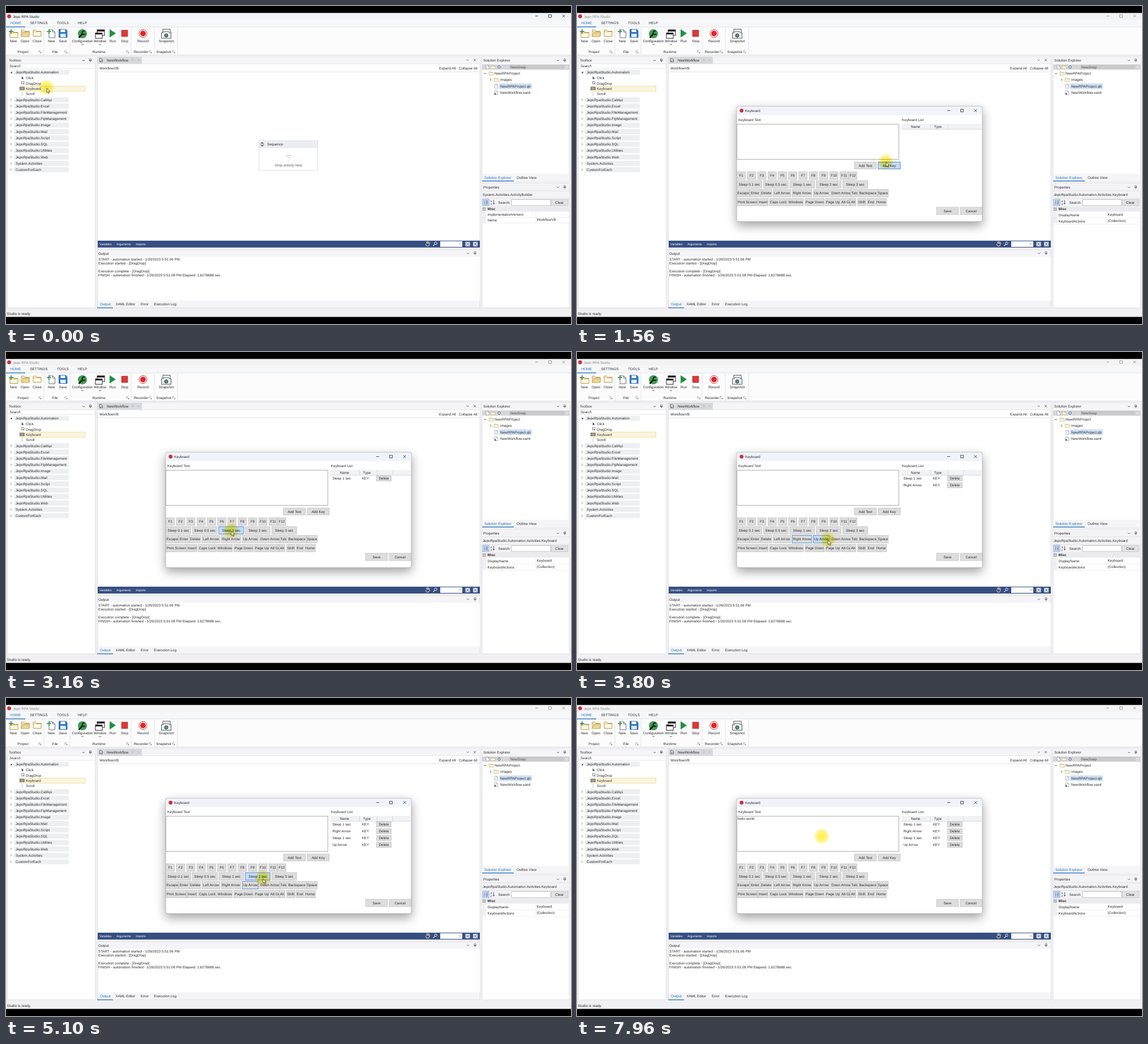
These frames come from a looping animation (998x561 px, 8000 ms). An HTML page:

```html
<!DOCTYPE html>
<html lang="en">
<head>
<meta charset="utf-8">
<title>Jepo RPA Studio</title>
<style>
html, body { margin: 0; width: 100%; height: 100%; overflow: hidden; background: #000; }
svg { display: block; width: 998px; height: 561px; }
text { font: 6.24px "Liberation Sans", Arial, sans-serif; fill: #2b2b2b; text-rendering: geometricPrecision; white-space: pre; }
.mid { text-anchor: middle; }
.it { font-style: italic; }
.bold { font-weight: bold; }
.blue { fill: #1f6fbf; }
.tree { font-size: 6.35px; }
.bar { font-size: 5.3px; fill: #fff; }
.glow { mix-blend-mode: multiply; }
.btn rect { fill: #dddddd; stroke: #b4b4b4; stroke-width: .6; }
.btn.focus rect { stroke: #4a7fc0; stroke-width: .9; }
.btn.hover rect { fill: #c3dbf8; stroke: #4a7fc0; stroke-width: .9; }
</style>
</head>
<body>
<svg id="stage" viewBox="0 0 998 561"></svg>
<script>
const LOOP = 8000;
const APP = 'Jepo RPA Studio', NS = 'JepoRpaStudio.';

// Markup helpers; text y is the vertical middle of the line.
const text = (x, y, s, cls = '', extra = '') =>
  `<text x="${x}" y="${y + 2.2}" class="${cls}" ${extra}>${s}</text>`;
const rect = (x, y, w, h, fill = 'none', stroke = 'none', sw = .6, extra = '') =>
  `<rect x="${x}" y="${y}" width="${w}" height="${h}" fill="${fill}" stroke="${stroke}" stroke-width="${sw}" ${extra}/>`;
const path = (d, stroke = '#444', fill = 'none', sw = .8) =>
  `<path d="${d}" stroke="${stroke}" fill="${fill}" stroke-width="${sw}"/>`;
const circle = (x, y, r, fill, stroke = 'none', sw = 1) =>
  `<circle cx="${x}" cy="${y}" r="${r}" fill="${fill}" stroke="${stroke}" stroke-width="${sw}"/>`;
const at = (x, y, s, k = 1) => `<g transform="translate(${x} ${y}) scale(${k})">${s}</g>`;
const group = (id, s) => `<g id="${id}">${s}</g>`;
const each = (list, fn) => list.map(fn).join('');

const chevron = (x, y, c) => path(`M${x - 2} ${y - 1}l2 2 2-2`, c);
const cross = (x, y, r = 2, c) => path(`M${x - r} ${y - r}l${2 * r} ${2 * r}m0 ${-2 * r}l${-2 * r} ${2 * r}`, c);
const pin = (x, y, c) => path(`M${x - 1.4} ${y - 2.6}h2.8v3h-2.8zM${x - 2.3} ${y + .4}h4.6M${x} ${y + .4}v2.5`, c, 'none', .7);
const drop = (x, y) => path(`M${x - 4.3} ${y - 2.4}h8.6l-4.3 5z`, '#b2b2b2', '#fff', .7);
const folder = (x, y, k = 1) => at(x, y, path('M-7 5.5v-11h5l1.5 2h7.5v9z', '#b89b4c', '#fff8e2', 1) + path('M-7-2.5h14', '#b89b4c'), k);
const page = (x, y, k = 1) => at(x, y, path('M-5-7h6.5l4 4v10H-5zM1.5-7v4h4', '#6a6f78', '#fff', 1), k);
const plus = (x, y) => path(`M${x - 4} ${y}h8m-4-4v8`, '#2f8a3c', 'none', 1.5);
const keys = (x, y) => rect(x, y, 8, 5, '#777', '#555', .5) +
  path(`M${x + 1} ${y + 1.5}h6m-6 1.2h6m-5 1.2h4`, '#ddd', 'none', .5);
const flow = (x, y) => path(`M${x} ${y - 3.8}l1.8 2h-3.6zM${x} ${y + 3.8}l1.8-2h-3.6zM${x - 2.5} ${y - 1.6}v3.2m5-3.2v3.2`, '#444', '#555', .7);
const winKeys = (x1, x2, x3, y, c) => path(`M${x1 - 2.5} ${y}h5`, c) + rect(x2 - 2.3, y - 2.3, 4.6, 4.6, 'none', c, .8) + cross(x3, y, 2.4, c);

function ribbon() {
  const labels = [['New', 13], ['Open', 33.5], ['Close', 55], ['New', 80], ['Save', 100.5], ['Configuration', 135],
    ['Window', 166], ['Run', 188.5], ['Stop', 209.5], ['Record', 242], ['Snapshot', 283]];
  const groups = [['Project', 30, 60, 67], ['File', 86.5, 106, 113], ['Runtime', 164, 215, 221],
    ['Recorder', 238.5, 255, 262], ['Snapshot', 278.5, 296, 303]];
  return rect(0, 24, 998, 13, '#f6f7f9') + rect(0, 37, 998, 49.5, '#fcfcfd') +
    path('M0 37h998M0 86.5h998', '#d9dade', 'none', .7) + rect(0, 36.2, 34, 1.3, '#1f6fbf') +
    text(17, 29.5, 'HOME', 'mid blue') + text(58, 29.5, 'SETTINGS', 'mid') + text(100.5, 29.5, 'TOOLS', 'mid') + text(135, 29.5, 'HELP', 'mid') +
    each(labels, ([s, x]) => text(x, 62, s, 'mid')) +
    each(groups, ([s, x, lx, line]) => text(x, 80.5, s, 'mid') + path(`M${line} 38v48`, '#dcdde1') +
      path(`M${lx - 2} 82.5v-3.5h3.5m-1.5 2l2 2m0-2v2h-2`, '#666', 'none', .6)) +
    folder(14, 50) + plus(9, 45) +
    folder(34, 48) + path('M26.5 54l3-7h12.5l-2 7z', '#b89b4c', '#efd78e') + folder(55, 48) +
    page(81, 49) + plus(76, 45) +
    path('M93.5 41h12l2.5 2.5V55.5H93.5z', '#1d5fae', '#2f77c8') + rect(96.5, 41.5, 8, 4.5, '#fff') + rect(96, 49, 9.5, 6, '#e8f0fa') +
    circle(135, 49, 8, '#3f9f50') + path('M128.5 56l6.5-7', '#1d1d1d', 'none', 2.6) + path('M139 44.5a3 3 0 1 0 1 4.5', '#1d1d1d', 'none', 2) +
    chevron(135, 68) + chevron(166, 68) +
    rect(161, 42, 13, 10, '#fff', '#222', 1) + rect(161, 42, 13, 3, '#222') + rect(158, 47.5, 12, 9.5, '#fff', '#222', 1) + rect(158, 47.5, 12, 2.6, '#222') +
    path('M183 41l11 7.2-11 7.2z', 'none', '#1f9140') + rect(204, 42.5, 11, 11.5, '#d9393a', '#b92c2e') +
    circle(242, 48.5, 7, '#fff', '#c9393b') + circle(242, 48.5, 5, '#e0262b') +
    rect(277, 41, 13, 9, '#fff', '#444', 1) + path('M274.5 47h3l1.5-2h8l1.5 2h3v10h-17z', '#333', '#e9edf0') + circle(283, 52, 3, '#4b9a8e', '#333');
}

function toolbox() {
  const cats = ['CallApi', 'Excel', 'FileManagement', 'FtpManagement', 'Image', 'Mail', 'Script', 'SQL', 'Utilities', 'Web']
    .map(s => NS + s).concat('System.Activities', 'CustomForEach');
  const head = (id, fill, c) => group(id, rect(2.5, 90, 155, 12, fill) +
    text(5, 96, 'Toolbox', '', `style="fill:${c}"`) + chevron(137, 96, c) + pin(149, 96, c));
  return rect(2.5, 90, 155, 442.5, '#fff', '#d3d4d9') + head('headIdle', '#f5f5f8', '#333') + head('headLive', '#0b72d0', '#fff') +
    rect(2.5, 102, 155, 8, '#fff', '#d3d4d9') + text(6, 106, 'Search', 'it') +
    rect(14, 112.4, 97, 9, '#eeeff1') + path('M7.5 118.5h3.3v-3.3z', 'none', '#333') + text(17, 117, NS + 'Automation') +
    rect(24, 141.2, 115.5, 9, '#faf5df', '#e6d57c', .7, 'id="row"') +
    path('M28 124.5v4.5l1.2-1 1.2 1.6M28 124.5l3 3h-2', '#336', '#446', .5) +
    rect(27.5, 133.5, 4.5, 4, 'none', '#447') + path('M30 136l2.5 2.5', '#447') + keys(24.5, 143) +
    path('M28.5 152v6m-1.2-4.6l1.2-1.4 1.2 1.4m-2.4 3.2l1.2 1.4 1.2-1.4', '#aaa', 'none', .5) +
    each(['Click', 'DragDrop', 'Keyboard', 'Scroll'], (s, i) => text(35, 127 + 9.4 * i, s)) +
    each(cats, (s, i) => {
      const y = 165.3 + 11.23 * i;
      return rect(14, y - 4.5, 97, 9, '#eeeff1') + path(`M8.5 ${y - 2}l2.2 2-2.2 2z`, '#999', '#fff', .6) + text(17, y, s);
    });
}

function designer() {
  return rect(161.5, 89.5, 675.5, 337, '#fff', '#d3d4d9') + rect(162, 89.5, 675, 12.5, '#f5f5f8') +
    rect(162, 89.5, 78, 12.5, '#d8d9dd') + path('M162 102h675M162 116h675', '#d9dade', 'none', .7) +
    path('M165.5 98.5v-6h3l2 2v4zM166.5 98l3-3', '#555') + text(178, 95.5, 'NewWorkflow') + pin(224, 95.5, '#c0c1c6') + cross(234, 95.5, 1.8, '#b8b9be') +
    chevron(815.5, 95.5) + cross(828, 95.5) +
    text(165, 109.5, 'WorkflowVB') + text(765, 109.5, 'Expand All') + text(800, 109.5, 'Collapse All') +
    rect(162, 414, 675, 12, '#364f82') + text(165, 419.7, 'Variables', 'bar') + text(195, 419.7, 'Arguments', 'bar') + text(229.3, 419.7, 'Imports', 'bar') +
    path('M741 420l2 3.5h3.5l1.5-3v-4m-5 3v-4m1.7 4v-4.5m1.7 4.5v-4', '#e8d9b8', 'none', 1) +
    circle(759, 418.5, 2.2, 'none', '#e8e8f0') + path('M757.5 420.3l-3 3', '#e8e8f0', 'none', 1.2) +
    rect(767, 415, 39, 10, '#fff') + path('M800 419l1.5 1.5 1.5-1.5', '#666') +
    each([815.5, 829], x => rect(x - 4, 416, 8, 8, '#dfe4ee') + cross(x, 420, 3, '#364f82'));
}

const sequence = (x, y, w, h) => rect(x, y, w, h, '#fff', '#d2d5dc', .8) + rect(x, y, w, 11.7, '#edeef2', '#d2d5dc', .5) +
  flow(x + 5.5, y + 6) + text(x + 14.3, y + 6, 'Sequence');

const emptyFlow = () => sequence(447, 238, 103.5, 52) + drop(499, 266) + text(499, 281, 'Drop activity here', 'mid it', 'style="fill:#555"');

const fullFlow = () => sequence(432.5, 209.8, 132.5, 108) + drop(499, 237.5) + drop(499, 249.5) + drop(499, 302) +
  rect(438, 260, 122, 31.5, '#fffdf6', '#e4c46c', .9) + rect(438, 260, 122, 11, '#fde3a4', '#e4c46c', .7) +
  keys(440, 263) + text(452, 265.6, 'Keyboard') + path('M552.7 265.3l2-2 2 2m-4 3l2-2 2 2', '#444', 'none', .7) +
  rect(442, 275.3, 114.5, 13, '#dddddd', '#b4b4b4') + text(499, 282, 'Open Keyboard', 'mid');

function output() {
  const lines = [[446.8, 'START - automation started - 1/26/2023 5:51:06 PM'], [454, 'Execution started - [DragDrop]'],
    [468, 'Execution complete - [DragDrop]'], [475, 'FINISH - automation finished - 1/26/2023 5:51:08 PM Elapsed: 1,6278688 sec.']];
  return rect(161.5, 430, 675.5, 102.5, '#f5f5f8', '#d3d4d9') + rect(162, 442.5, 675, 77, '#fff') +
    text(163, 436.3, 'Output') + chevron(816, 436.3) + pin(828.5, 436.3) + each(lines, ([y, s]) => text(163, y, s)) +
    text(166, 525.7, 'Output', 'blue') + rect(161, 531.8, 28, 1.3, '#1f6fbf') +
    text(193.5, 525.7, 'XAML Editor') + text(238, 525.7, 'Error') + text(261.5, 525.7, 'Execution Log');
}

function explorer() {
  return rect(841, 90, 154, 219, '#fff', '#d3d4d9') + rect(841, 90, 154, 12, '#f5f5f8') + text(843, 96, 'Solution Explorer') + chevron(975, 96) + pin(987, 96) +
    rect(841, 103, 154, 9.3, '#d6d6d8') + rect(889, 103.5, 96, 8.4, '#cacacc') + rect(986.5, 104, 7.5, 7.5, '#dcdcde', '#bbb') +
    page(850.5, 107.7, .5) + folder(860.5, 107.7, .5) + circle(871, 107.7, 2.3, 'none', '#3a78b5') + text(891, 107.7, 'NewSnap', '', 'style="fill:#555"') +
    chevron(846, 119) + folder(857, 119, .55) + text(863, 119, 'NewRPAProject', 'tree') +
    path('M855 128l2 2-2 2') + folder(866, 130, .55) + text(873, 130, 'images', 'tree') +
    rect(871, 136.5, 58, 10, '#cfe0f5') + page(866, 141.5, .5) + text(873, 141.5, 'NewRPAProject.qb', 'tree') +
    page(866, 153, .5) + rect(862.5, 153.5, 3, 3, '#4b72ad') + text(873, 153, 'NewWorkflow.xaml', 'tree') +
    rect(841, 296, 154, 13.5, '#f5f5f8') + text(845, 302.3, 'Solution Explorer', 'blue') + text(902, 302.3, 'Outline View') + rect(841, 308, 56, 1.3, '#1f6fbf');
}

function props() {
  const table = (id, name, rows) => group(id, text(842, 332.5, name) +
    each(rows, ([k, v, y, vy]) => text(850.5, y, k) + text(937.5, vy, v) + path(`M841 ${y + 5}h154`, '#e4e4e8', 'none', .6)));
  return rect(841, 313, 154, 219.5, '#fff', '#d3d4d9') + rect(841, 313, 154, 49.5, '#f3f3f6') + text(843, 319.8, 'Properties') + chevron(975, 319.8) + pin(987, 319.8) +
    path('M841 326h154M841 339.5h154', '#dcdde1') +
    rect(842, 341, 11, 11, '#cfe2f7', '#4a7fc0') + path('M844.5 344h2m1.5 0h3m-6.5 2.5h2m1.5 0h3m-6.5 2.5h2m1.5 0h3', '#335', 'none', .9) +
    text(855.5, 344, 'A', '', 'style="font-size:4.5px"') + text(855.5, 349, 'Z', '', 'style="font-size:4.5px"') + path('M861.5 342.5v7m-1.5-1.8l1.5 1.8 1.5-1.8', '#335') +
    text(869.5, 346.7, 'Search:') + rect(893, 341.7, 69, 10.3, '#fff', '#999') + rect(963, 341.5, 30, 10.7, '#e2e2e4', '#b4b4b4') + text(977.5, 346.8, 'Clear', 'mid') +
    rect(841, 353.5, 154, 9, '#ebebef') + rect(842.5, 356, 4.3, 4.3, '#fff', '#555') + path('M843.3 358.1h2.7') + text(850.5, 358, 'Misc', 'bold') +
    rect(841, 362.5, 7, 21, '#f0f0f3') + path('M936 363v20', '#e4e4e8') +
    table('propsFlow', 'System.Activities.ActivityBuilder', [['ImplementationVersion', '', 368, 368], ['Name', 'WorkflowVB', 378, 376.8]]) +
    table('propsKeys', NS + 'Automation.Activities.Keyboard', [['DisplayName', 'Keyboard', 369, 367.5], ['KeyboardActions', '(Collection)', 380, 378.5]]);
}

// Dialog buttons: label, x, width per row.
const rows = [
  [275.2, 12.2, [['Add Text', 490, 39], ['Add Key', 532, 39]]],
  [292.5, 13.5, ['F1', 'F2', 'F3', 'F4', 'F5', 'F6', 'F7', 'F8', 'F9', 'F10', 'F11', 'F12']
    .map((s, i) => [s, i < 11 ? 282.8 + 18.17 * i : 479.6, 14.8])],
  [308, 13.3, [.1, .5, 1, 2, 3].map((n, i) => [`Sleep ${n} sec`, 282.5 + 46.7 * i, 44])],
  [323.6, 13.3, [['Escape', 282.6, 22], ['Enter', 305.6, 17.6], ['Delete', 324.6, 19.4], ['Left Arrow', 346.4, 31.4], ['Right Arrow', 380, 34.8],
    ['Up Arrow', 417.4, 28.4], ['Down Arrow', 447.7, 36.5], ['Tab', 484, 11.8], ['Backspace', 497, 33.3], ['Space', 531.2, 18.8]]],
  [339.2, 13.3, [['Print Screen', 282.6, 36.4], ['Insert', 319.8, 17.8], ['Caps Lock', 339.8, 31.6], ['Windows', 373, 27], ['Page Down', 402.8, 34.2],
    ['Page Up', 439, 26], ['Alt Gr', 466.8, 16.4], ['Alt', 482.4, 10.4], ['Shift', 495.7, 14.6], ['End', 512.6, 13], ['Home', 527.6, 19]]],
  [355, 13, [['Save', 635, 39], ['Cancel', 677, 38.5]]]
];
const buttons = rows.flatMap(([y, h, list]) => list.map(([label, x, w]) => ({ label, x, y, w, h })));
const button = b => `<g class="btn">${rect(b.x, b.y, b.w, b.h)}${text(b.x + b.w / 2, b.y + b.h / 2, b.label, 'mid')}</g>`;

// Clicks that add a key: time, button, time of its list row.
const clicks = [[2780, 'Sleep 1 sec', 2840], [3500, 'Right Arrow', 3540], [4340, 'Sleep 1 sec', 4380], [4720, 'Up Arrow', 4760]];

function dialog() {
  return rect(282, 177, 434, 203.5, '#fff', '#9a9ca2', .8, 'rx="3" filter="url(#shadow)"') +
    path('M282.4 192.5v-12q0-3 3-3h427.2q3 0 3 3v12z', 'none', '#f0f3f9') +
    circle(290.7, 184.6, 3.4, '#cf2f3a') + text(297, 184.7, 'Keyboard') + winKeys(656.5, 680, 704, 184.5, '#222') +
    text(285, 200.5, 'Keyboard Text') + rect(282.5, 208.5, 286, 62, '#fff', '#9b9b9b', .8) + text(574, 200.5, 'Keyboard List') +
    rect(573, 208, 142.5, 9.4, '#f1f2f4') + path('M624.5 208v9.4M655.5 208v9.4M573 217.4h142.5', '#d3d4d8') +
    text(598, 212.7, 'Name', 'mid') + text(637.5, 212.7, 'Type', 'mid') +
    each(clicks, ([, label], i) => {
      const y = 223 + 12 * i;
      return group('item' + i, text(576.5, y, label) + text(628.7, y, 'KEY') + rect(654.5, y - 4.7, 26, 9.4, '#dddddd', '#b4b4b4') +
        text(667.5, y, 'Delete', 'mid') + (i ? '' : path('M683 208v9.4', '#d3d4d8')));
    }) +
    group('pad', each(buttons, button)) +
    text(283.7, 212.5, '', '', 'id="typed"') + rect(284, 209, .8, 7, '#111', 'none', 0, 'id="caret"');
}

const titleBar = (id, fill, c) => group(id, rect(0, 12.5, 998, 11.8, fill) +
  text(12, 18.5, APP, '', `style="fill:${c}"`) + winKeys(937.5, 961, 985, 17.7, c));

document.getElementById('stage').innerHTML = `<defs>
  <radialGradient id="spot"><stop offset=".3" stop-color="#fff05a"/><stop offset=".7" stop-color="#fff27a" stop-opacity=".85"/><stop offset="1" stop-color="#fff6a0" stop-opacity="0"/></radialGradient>
  <filter id="shadow" x="-10%" y="-20%" width="120%" height="145%"><feDropShadow dx="0" dy="7" stdDeviation="9" flood-color="#000" flood-opacity=".36"/></filter>
  </defs>` +
  rect(0, 0, 998, 561, '#000') + rect(0, 12.5, 998, 536, '#f0f0f3') +
  titleBar('live', '#f0f4fa', '#222') + titleBar('idle', '#f3f3f4', '#8a8a8a') + circle(5.5, 18.2, 3.4, '#cf2f3a') +
  ribbon() + toolbox() + designer() + group('empty', emptyFlow()) + group('full', fullFlow()) +
  output() + explorer() + props() + text(1.5, 543, 'Studio is ready.') + group('dialog', dialog()) +
  '<g class="glow" id="glow"><circle cx="-.4" cy="-1" r="14.5" fill="url(#spot)"/></g>' +
  group('arrow', path('M0 0v7.8l1.8-1.6 1.3 2.9 1.4-.6-1.3-2.8h2.5z', '#222', '#fff', .7));

const el = id => document.getElementById(id);
const show = (id, on) => { el(id).style.display = on ? '' : 'none'; };
const btnEls = [...el('pad').children];

// Pointer stops: time, x, y.
const stops = [[0, 72, 145], [80, 72, 145], [640, 479, 261], [880, 479, 261], [1060, 490, 281], [1230, 490, 281], [1560, 546, 275.5],
  [1680, 540, 279], [1960, 318, 304], [2160, 365, 313], [2600, 398, 316], [3160, 398, 316], [3460, 399, 331], [3540, 400, 331],
  [3800, 443.3, 332], [3960, 446, 331], [4000, 446, 331], [4300, 398, 316], [4400, 398, 316], [4680, 432, 331], [4880, 432, 331],
  [5100, 454, 319], [5440, 432.5, 245], [LOOP, 432.5, 245]];
function pointer(t) {
  const i = stops.findIndex(s => s[0] > t);
  const [t0, x0, y0] = stops[i - 1], [t1, x1, y1] = stops[i];
  const p = (t - t0) / (t1 - t0), k = p * p * (3 - 2 * p);
  return [x0 + (x1 - x0) * k, y0 + (y1 - y0) * k];
}
const inside = (x, y, b) => x >= b.x && x <= b.x + b.w && y >= b.y && y <= b.y + b.h;

const DROP = 645, OPEN = 1250, FIELD = 5700, TYPE = 6870, WORDS = 'hello world';
const box = { x: 282.5, y: 208.5, w: 286, h: 62 };

function render(t) {
  const [x, y] = pointer(t), open = t >= OPEN, picked = t >= 100 && t < 960;
  show('live', !open);
  show('idle', open);
  show('headLive', picked);
  show('headIdle', !picked);
  el('row').setAttribute('fill', picked ? '#0b72d0' : '#faf5df');
  el('row').setAttribute('stroke', picked ? '#0b72d0' : '#e6d57c');
  show('empty', t < DROP);
  show('full', t >= DROP);
  show('propsFlow', t < DROP);
  show('propsKeys', t >= DROP);
  show('dialog', open);

  const last = clicks.filter(c => t >= c[0]).pop();
  const focus = last && t < FIELD ? last[1] : '';
  clicks.forEach((c, i) => show('item' + i, t >= c[2]));
  buttons.forEach((b, i) => {
    btnEls[i].setAttribute('class', 'btn' + (b.label === focus ? ' focus' : '') + (inside(x, y, b) ? ' hover' : ''));
  });

  const n = Math.max(0, Math.min(WORDS.length, Math.floor((t - TYPE) / 74) + 1));
  el('typed').textContent = WORDS.slice(0, n);
  show('caret', (t >= FIELD && t < 6360) || (t >= TYPE && t < 7930));
  el('caret').setAttribute('x', 284 + (n && open ? el('typed').getComputedTextLength() : 0));

  const move = `translate(${x.toFixed(2)} ${y.toFixed(2)})`;
  el('glow').setAttribute('transform', move);
  el('arrow').setAttribute('transform', move);
  show('arrow', !(open && inside(x, y, box)));
}

const start = performance.now();
function tick() {
  render((performance.now() - start) % LOOP);
  requestAnimationFrame(tick);
}
tick();
</script>
</body>
</html>
```
